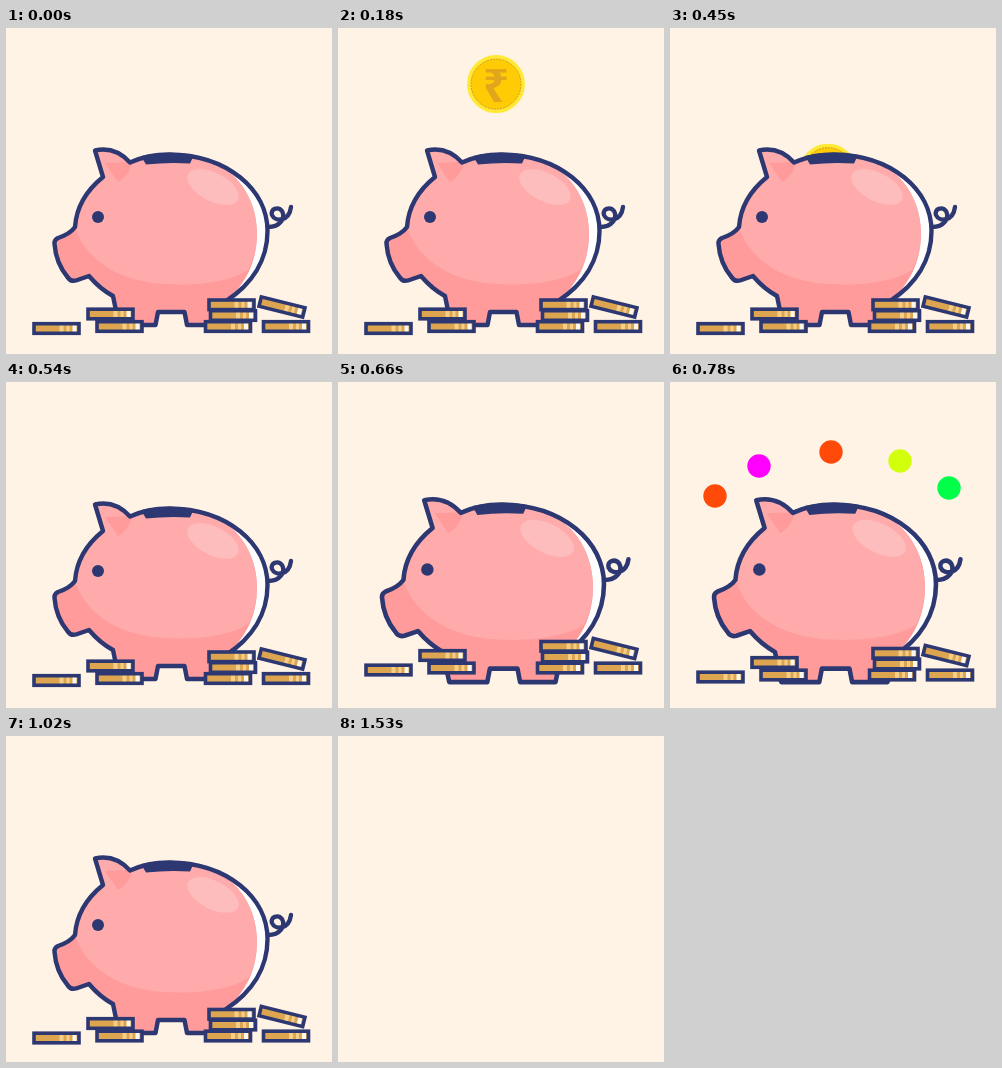
An HTML page for the animation above (1560 ms loop, 326 by 326 pixels).

```html
<!DOCTYPE html>
<html lang="en">
<head>
<meta charset="utf-8">
<title>Piggy bank</title>
<style>
html, body { margin: 0; width: 100%; height: 100%; overflow: hidden; background: #fff3e5; }
svg { display: block; width: 100vw; height: 100vh; }
.line { fill: none; stroke: #2d3873; stroke-width: 4.4; stroke-linejoin: round; stroke-linecap: round; }
.rupee { font: bold 46px "Noto Sans", "DejaVu Sans", sans-serif; text-anchor: middle; fill: #e0a61c; }
</style>
</head>
<body>
<svg viewBox="0 0 326 326">
  <defs>
    <path id="body" d="M97 149L89 122.500Q109 118 124 134.500C137 128.500 150 126.500 163 126.500C222 127 261.500 162 261.500 203C261.500 232 246 256 220 273L215 297H181L178.500 284H152L149.500 297H113L107 268Q94 261 83 248L70 252.500Q64.500 254 61.500 249C54 240 49.500 229 48.500 216Q48 212 52 210Q64 206 69 199Q71 170 97 149Z"/>
    <clipPath id="inside"><use href="#body"/></clipPath>
    <g id="token">
      <rect x="-22.500" y="-4.800" width="45" height="9.600" fill="#dda54f"/>
      <path d="M3-4.800h4v9.600h-4z" fill="#f5cf87"/>
      <path d="M10-4.800h3v9.600h-3z" fill="#f5cf87"/>
      <path d="M16-4.800h4v9.600h-4z" fill="#fff8ee"/>
      <rect x="-22.500" y="-4.800" width="45" height="9.600" class="line" style="stroke-width:3.600;stroke-linejoin:miter"/>
    </g>
  </defs>
  <g id="scene">
    <g id="dots"></g>
    <g id="coin">
      <circle r="29" fill="#ffe936"/>
      <circle r="25" fill="#ffcb05" stroke="#c9971c" stroke-width=".9" stroke-dasharray="2 1"/>
      <text class="rupee" y="17.500">₹</text>
    </g>
    <g id="pig">
      <path class="line" d="M262 199C274 199 280 190 276 183C272 178 264 181 266 187C269 194 283 194 285 179"/>
      <use href="#body" fill="#ff9b9b"/>
      <g clip-path="url(#inside)">
        <path d="M185 125C230 138 251 170 251 205C251 235 240 255 218 276L270 276V120Z" fill="#fff"/>
        <path d="M70 202C70 170 85 155 97 149L86 118L124 130L163 124C225 125 251 166 251 205Q251 226 242 242C225 253 195 258 160 256C115 254 82 234 70 202Z" fill="#ffabab"/>
        <path d="M99 135L112 154Q122 148 125 138L123 134Z" fill="#ff9b9b"/>
        <ellipse cx="207" cy="159" rx="28" ry="14" transform="rotate(27 207 159)" fill="#fdbdbd"/>
      </g>
      <use href="#body" class="line"/>
      <path d="M135 128Q162 122 188 127L184 135.500Q162 134 140 136.500Z" fill="#2d3873"/>
      <circle cx="92" cy="189" r="6" fill="#2d3873"/>
    </g>
    <g id="piles"></g>
  </g>
</svg>
<script>
const LOOP = 1560, STEP = 30;
const $ = id => document.getElementById(id);

function add(parent, tag, attrs) {
  const el = document.createElementNS("http://www.w3.org/2000/svg", tag);
  for (const key in attrs) el.setAttribute(key, attrs[key]);
  return parent.appendChild(el);
}

// x, y, tilt
const tokens = [
  [50.5, 300.5, 0], [113.5, 298.5, 0], [104.5, 286, 0],
  [222, 298.5, 0], [227, 287.5, 0], [225.5, 276.8, 0],
  [280, 298.5, 0], [276, 279, 14]
];
for (const [x, y, tilt] of tokens)
  add($("piles"), "use", { href: "#token", transform: `translate(${x} ${y}) rotate(${tilt})` });

// offset from the burst centre, colour
const burst = { x: 161, y: 200 };
const dots = [
  [-116, -86, "#ff4a0a"], [-72, -116, "#ff00ff"], [0, -130, "#ff4a0a"],
  [69, -121, "#d2ff0c"], [118, -94, "#00ff48"]
].map(([dx, dy, fill]) => ({ dx, dy, el: add($("dots"), "circle", { r: 11.7, fill }) }));

// time, value
const hop = [[450, 0], [540, -2], [660, -12.5], [780, -5.5], [900, 1.5]];
const swell = [[540, 1], [660, 1.042], [780, 1.042], [960, 1]];
const spread = [[600, 0], [660, .35], [780, 1], [870, 1.15]];
const fade = [[870, 1], [990, 0]];

function track(keys, t) {
  if (t <= keys[0][0]) return keys[0][1];
  for (let i = 1; i < keys.length; i++) {
    const [a, from] = keys[i - 1], [b, to] = keys[i];
    if (t < b) {
      const p = (t - a) / (b - a);
      return from + (to - from) * p * p * (3 - 2 * p);
    }
  }
  return keys[keys.length - 1][1];
}

function show(el, on) { el.setAttribute("visibility", on ? "visible" : "hidden"); }

function draw(t) {
  $("scene").style.display = t < 1530 ? "" : "none";

  const fall = Math.max(0, t - 30);
  show($("coin"), t >= 30 && t < 510);
  $("coin").setAttribute("transform", `translate(158 ${35 + 64 * (fall / 300) ** 1.6})`);
  $("coin").setAttribute("opacity", Math.min(1, t / 90));

  const s = track(swell, t);
  $("pig").setAttribute("transform", `translate(155 222) scale(${s}) translate(-155 -222)`);
  $("piles").setAttribute("transform", `translate(0 ${track(hop, t)})`);

  const k = track(spread, t);
  show($("dots"), t > 600 && t < 990);
  $("dots").setAttribute("opacity", track(fade, t));
  for (const d of dots) {
    d.el.setAttribute("cx", burst.x + d.dx * k);
    d.el.setAttribute("cy", burst.y + d.dy * k);
  }
}

const start = performance.now();
function tick() {
  const t = (performance.now() - start) % LOOP;
  draw(Math.floor(t / STEP) * STEP);
  requestAnimationFrame(tick);
}
draw(0);
tick();
</script>
</body>
</html>
```
